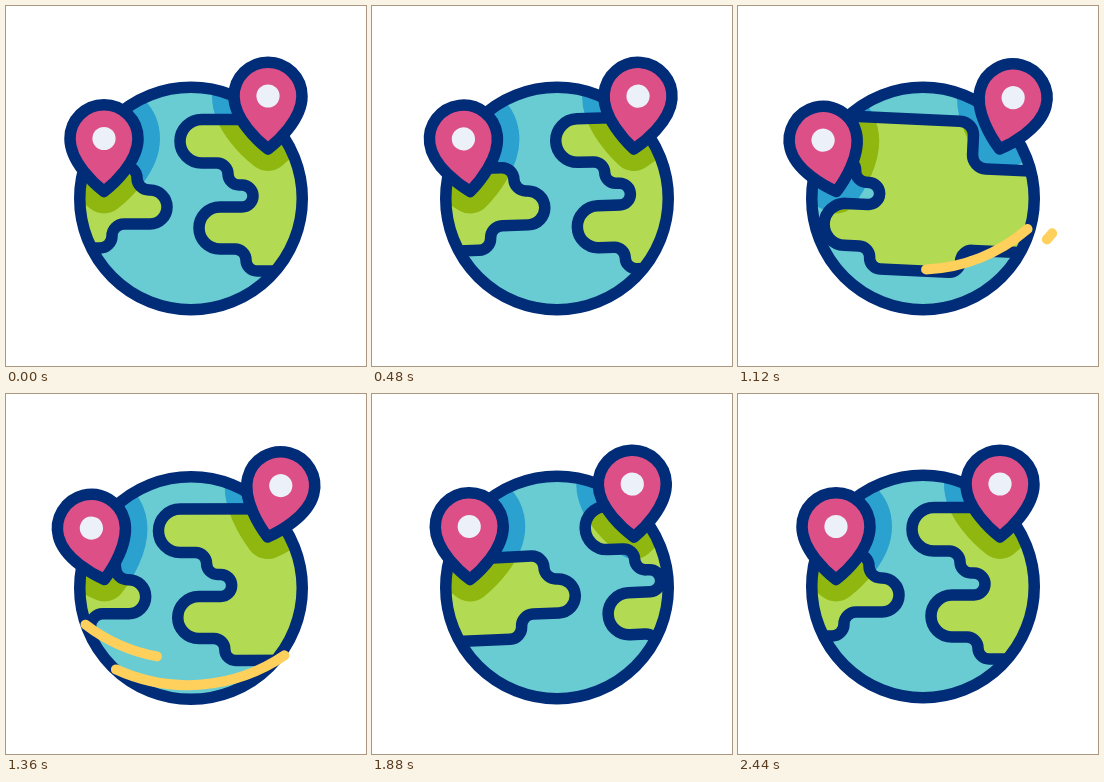
These frames come from a looping animation (360x360 px, 3 s). An HTML page with a canvas:

```html
<!DOCTYPE html>
<html lang="en">
<head>
<meta charset="utf-8">
<title>Spinning globe</title>
<style>
html, body { margin: 0; width: 100%; height: 100%; overflow: hidden; background: #fff; }
canvas { display: block; width: 360px; height: 360px; }
</style>
</head>
<body>
<canvas id="stage"></canvas>
<script>
const canvas = document.getElementById('stage');
const ctx = canvas.getContext('2d');
const dpr = window.devicePixelRatio || 1;
canvas.width = canvas.height = 360 * dpr;

const NAVY = '#002c78', SEA = '#68ccd2', SEA_DARK = '#2ba1d0';
const LAND = '#b2da52', LAND_DARK = '#8fb70f';
const PINK = '#dd4f87', DOT = '#ecf1f9', YELLOW = '#ffd05b';
const LOOP = 3000, STEP = 40, LINE = 11.5;
const CX = 185, CY = 192.5, R = 111.25, PERIOD = 295;

const rad = deg => deg * Math.PI / 180;
const part = (t, a, b) => Math.min(1, Math.max(0, (t - a) / (b - a)));
const smooth = (t, a, b) => { const s = part(t, a, b); return s * s * (3 - 2 * s); };
const bump = (t, a, b) => Math.sin(Math.PI * part(t, a, b)) ** 2;

// Cubic-bezier easing with handles (x1, 0) and (x2, 1)
function bezier(x, x1, x2) {
  let lo = 0, hi = 1;
  for (let i = 0; i < 30; i++) {
    const s = (lo + hi) / 2, r = 1 - s;
    if (3 * r * r * s * x1 + 3 * r * s * s * x2 + s * s * s < x) lo = s; else hi = s;
  }
  return smooth(lo, 0, 1);
}

// The map winds up to the right, then makes two full turns to the left
const scroll = t => 14 * bezier(part(t, 240, 680), 0.33, 0.24) -
  (2 * PERIOD + 14) * bezier(part(t, 680, 2400), 0.44, 0.23);
const tilt = t => -2.5 * bump(t, 200, 1100) + 2.7 * bump(t, 900, 1360) - 3.6 * bump(t, 1300, 2160);
const bob = t => -2 * bump(t, 480, 1120) + 3 * bump(t, 1120, 2060);

const pins = [
  { x: 98, y: 184, lean: -14.5, delay: 0, rebound: 0.3 },
  { x: 262, y: 141.5, lean: 14.8, delay: 100, rebound: 0.7 }
];

// Lean out, swing back past upright, settle
function swing({ lean, delay, rebound }, t) {
  const last = 0.38, start = 240 + delay;
  return lean * (Math.sin(Math.PI / 2 * part(t, start, start + 710)) -
    (1 + rebound) * smooth(t, 1340, 1600) +
    (rebound + last) * smooth(t, 1600, 2140) -
    last * smooth(t, 2140, 2440));
}

const streaks = [
  { cy: -95, r: 166, half: 0.7, start: 920 },
  { cy: -75, r: 172, half: 0.835, start: 1080 }
];

// The coast alternates level and upright runs: next x, next y, optional corner radius
const COAST_Y = 160;
const coast = [
  [426, 184], [456, 218], [401, 242], [331, 265], [240, 243],
  [193, 201], [247, 179], [222, 157], [174, 113.5], [338, COAST_Y, 14]
];

const land = new Path2D();
land.moveTo(380, COAST_Y);
coast.forEach(([x, y, radius], i) => {
  const y0 = i ? coast[i - 1][1] : COAST_Y;
  const nextX = i < coast.length - 1 ? coast[i + 1][0] : 380;
  const r = radius || Math.abs(y - y0) / 2;
  land.arcTo(x, y0, x, y, r);
  land.arcTo(x, y, nextX, y, r);
});
land.closePath();

function landPath(shift, angle) {
  const all = new Path2D();
  const turn = new DOMMatrix().translate(CX, CY).rotate(angle).translate(-CX, -CY);
  for (let k = -2; k <= 1; k++) {
    all.addPath(land, turn.translate(shift % PERIOD + k * PERIOD, 0));
  }
  return all;
}

// Pin with its tip near the local origin
const pinShape = new Path2D('M0 1.5C-9 -5.5 -34 -28 -34 -51.3A34 34 0 0 1 34 -51.3C34 -28 9 -5.5 0 1.5Z');

function atPin(pin, t, draw) {
  ctx.save();
  ctx.translate(pin.x, pin.y);
  ctx.rotate(rad(swing(pin, t)));
  draw();
  ctx.restore();
}

function drawShadows(t, color) {
  ctx.save();
  ctx.translate(0, -bob(t));
  ctx.fillStyle = ctx.strokeStyle = color;
  ctx.lineWidth = 44;
  for (const pin of pins) {
    atPin(pin, t, () => {
      ctx.fill(pinShape);
      ctx.stroke(pinShape);
    });
  }
  ctx.restore();
}

function drawGlobe(t) {
  const ground = landPath(scroll(t), tilt(t));
  const disc = new Path2D();
  disc.arc(CX, CY, R, 0, 2 * Math.PI);

  ctx.save();
  ctx.translate(0, bob(t));
  ctx.save();
  ctx.clip(disc);
  ctx.fillStyle = SEA;
  ctx.fillRect(0, 0, 360, 360);
  drawShadows(t, SEA_DARK);
  ctx.fillStyle = LAND;
  ctx.fill(ground);
  ctx.save();
  ctx.clip(ground);
  drawShadows(t, LAND_DARK);
  ctx.restore();
  ctx.lineWidth = LINE;
  ctx.strokeStyle = NAVY;
  ctx.stroke(ground);
  ctx.restore();
  ctx.lineWidth = LINE;
  ctx.strokeStyle = NAVY;
  ctx.stroke(disc);
  ctx.restore();
}

function drawStreaks(t) {
  ctx.save();
  ctx.translate(CX, CY + bob(t));
  ctx.rotate(rad(-2.5));
  ctx.strokeStyle = YELLOW;
  ctx.lineWidth = 10;
  for (const { cy, r, half, start } of streaks) {
    const head = smooth(t, start, start + 400);
    const tail = smooth(t, start + 160, start + 620);
    if (head <= tail) continue;
    const from = Math.PI / 2 - half;
    ctx.beginPath();
    ctx.arc(0, cy, r, from + 2 * half * tail, from + 2 * half * head);
    ctx.stroke();
  }
  ctx.restore();
}

function drawPin(pin, t) {
  atPin(pin, t, () => {
    ctx.fillStyle = PINK;
    ctx.fill(pinShape);
    ctx.strokeStyle = NAVY;
    ctx.lineWidth = LINE;
    ctx.stroke(pinShape);
    ctx.fillStyle = DOT;
    ctx.beginPath();
    ctx.arc(0, -51.5, 11.6, 0, 2 * Math.PI);
    ctx.fill();
  });
}

function draw(t) {
  ctx.setTransform(dpr, 0, 0, dpr, 0, 0);
  ctx.fillStyle = '#fff';
  ctx.fillRect(0, 0, 360, 360);
  ctx.lineCap = ctx.lineJoin = 'round';
  drawGlobe(t);
  drawStreaks(t);
  pins.forEach(pin => drawPin(pin, t));
}

function frame() {
  const t = performance.now() % LOOP;
  draw(Math.floor(t / STEP) * STEP);
  requestAnimationFrame(frame);
}
frame();
</script>
</body>
</html>
```
